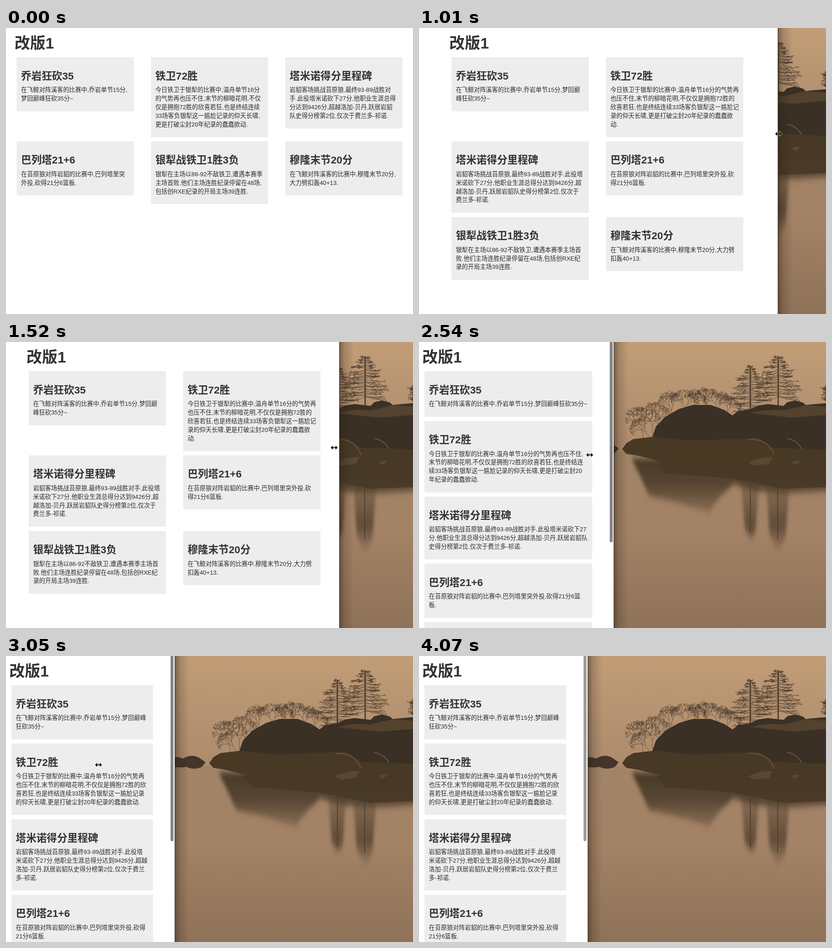
Animation of 893 by 627 pixels, one loop 4.17 s. Source, as an HTML page:

```html
<!DOCTYPE html>
<html lang="zh-CN">
<head>
<meta charset="utf-8">
<title>改版1</title>
<style>
  html, body { margin: 0; width: 100%; height: 100%; overflow: hidden; background: #fff; }
  svg { display: block; width: 893px; height: 627px; }
  text { font-family: "Liberation Sans", "Noto Sans CJK SC", "Noto Sans CJK", sans-serif; fill: #333; }
  .title { font-size: 33.9px; font-weight: 700; }
  .head { font-size: 22.6px; font-weight: 700; }
  .body { font-size: 13.19px; fill: #2b2b2b; }
</style>
</head>
<body>
<svg viewBox="0 0 893 627">
  <defs>
    <linearGradient id="sky" x1="0" y1="0" x2="0" y2="1">
      <stop offset="0" stop-color="#c19d77"/><stop offset=".5" stop-color="#b69371"/><stop offset="1" stop-color="#ac8a6b"/>
    </linearGradient>
    <linearGradient id="water" x1="0" y1="0" x2="0" y2="1">
      <stop offset="0" stop-color="#a38467"/><stop offset=".45" stop-color="#a38265"/><stop offset="1" stop-color="#8f7258"/>
    </linearGradient>
    <linearGradient id="mirror" gradientUnits="userSpaceOnUse" x1="0" y1="250" x2="0" y2="380">
      <stop offset="0" stop-color="#463726"/><stop offset=".5" stop-color="#4b3b29" stop-opacity=".85"/><stop offset="1" stop-color="#5a4733" stop-opacity=".3"/>
    </linearGradient>
    <linearGradient id="streak" gradientUnits="userSpaceOnUse" x1="0" y1="310" x2="0" y2="465">
      <stop offset="0" stop-color="#4b3b29" stop-opacity=".3"/><stop offset=".6" stop-color="#4b3b29" stop-opacity=".75"/><stop offset="1" stop-color="#4b3b29" stop-opacity="0"/>
    </linearGradient>
    <linearGradient id="shade">
      <stop offset="0" stop-color="#2a2016" stop-opacity=".5"/><stop offset=".35" stop-color="#2a2016" stop-opacity=".2"/><stop offset="1" stop-color="#2a2016" stop-opacity="0"/>
    </linearGradient>
    <filter id="soft" x="-30%" y="-20%" width="160%" height="140%"><feGaussianBlur stdDeviation="3 7"/></filter>
  </defs>
  <rect width="893" height="250" fill="url(#sky)"/>
  <rect y="240" width="893" height="387" fill="url(#water)"/>
  <g filter="url(#soft)">
    <path fill="url(#mirror)" d="M466 255H900V326L820 332 740 328 690 312 660 340 636 374 600 362 560 350 505 338 488 300Z"/>
    <path fill="url(#streak)" d="M707 310H746L738 420 728 432 715 410ZM762 310H813L804 430 788 465 769 420Z"/>
  </g>
  <path fill="#463726" opacity=".8" d="M520 262H893V318L800 322 690 300 600 292 540 288Z"/>
  <path stroke="#44362a" stroke-width="2" opacity=".7" d="M727 300V418M787 300V432"/>
  <g id="plants" fill="none" stroke="#43362a"></g>
  <path fill="#43352a" d="M360 226Q376 218 388 225 410 212 428 226L438 233 430 243Q412 251 396 243 380 246 360 242Z"/>
  <path fill="#3a3025" d="M446 235L455 222 470 213 512 208 520 185 540 164 570 147 600 138 640 138 670 149 688 161 700 151 725 148 745 139 765 136 800 140 808 132 825 128 843 133 848 138 893 134V258L560 255 480 249 455 245Z"/>
  <path fill="#5a4932" d="M728 156Q760 146 800 150L850 138 893 142V160L820 166Z" opacity=".75"/>
  <path fill="#483925" d="M446 235L458 221 472 213 520 208 590 216 700 212 745 210 778 232 893 236V270H560L480 249 455 245Z"/>
  <path fill="#584732" d="M722 264Q745 252 776 252L768 267 735 271ZM818 264Q830 256 836 262L826 270Z"/>
  <path fill="none" stroke="#69553c" stroke-width="2" d="M722 214Q765 210 779 247M808 211Q832 217 839 234"/>
  <g id="page"></g>
</svg>
<script>
const LOOP = 4170, U = 0.942;
const cards = [
  ['乔岩狂砍35', '在飞鲸对阵溪客的比赛中,乔岩单节15分,梦回巅峰狂砍35分~'],
  ['铁卫72胜', '今日铁卫于银犁的比赛中,温舟单节16分的气势再也压不住,末节的柳暗花明,不仅仅是拥抱72胜的欣喜若狂,也是终结连续33场客负银犁这一尴尬记录的仰天长啸,更是打破尘封20年纪录的蠢蠢欲动.'],
  ['塔米诺得分里程碑', '岩貂客场挑战苔原狼,最终93-89战胜对手.此役塔米诺砍下27分,他职业生涯总得分达到9426分,超越洛加-贝丹,跃居岩貂队史得分榜第2位,仅次于费兰多-祁诺.'],
  ['巴列塔21+6', '在苔原狼对阵岩貂的比赛中,巴列塔里突外投,砍得21分6篮板.'],
  ['银犁战铁卫1胜3负', '银犁在主场以86-92不敌铁卫,遭遇本赛季主场首败.他们主场连胜纪录停留在48场,包括创RXE纪录的开局主场39连胜.'],
  ['穆隆末节20分', '在飞鲸对阵溪客的比赛中,穆隆末节20分,大力劈扣轰40+13.']
];

// ems: line length of the body text; edge: right side of the window
const narrow = { cols: 1, x: 12, pitch: 0, w: 310.7, ems: 22.05, edge: 370, bar: [361, 406, '#858585'] };
const states = [
  { at: 0, cols: 3, x: 23.5, pitch: 294.6, w: 257, ems: 18.05, edge: 893 },
  { at: 1010, cols: 2, x: 71.3, pitch: 339, w: 301.2, ems: 21.42, edge: 787, cursor: [789, 232] },
  { at: 1520, cols: 2, x: 49.8, pitch: 339, w: 301.2, ems: 21.42, edge: 731, cursor: [720, 231.5] },
  { at: 2030, cols: 1, x: 12, pitch: 0, w: 623, ems: 45.8, edge: 680, bar: [673, 477, '#858585'], cursor: [672.5, 232] },
  { at: 2540, cols: 1, x: 12, pitch: 0, w: 368, ems: 26.42, edge: 427, bar: [418.5, 439, '#858585'], cursor: [374.5, 247.5] },
  { ...narrow, at: 3050, cursor: [203, 238.5] },
  { ...narrow, at: 3560 },
  { ...narrow, at: 4070, bar: [361, 406, '#9c9c9c'] }
];

const glyphWidth = c => c > '\u2e80' ? 1 : /\d/.test(c) ? .556 : /[,.]/.test(c) ? .278 : c === '-' ? .333 : /[+~]/.test(c) ? .584 : .685;
const textWidth = s => [...s].reduce((sum, c) => sum + glyphWidth(c), 0);

function wrap(text, ems) {
  const lines = [''];
  for (const part of text.match(/(?:\d+(?:[-+]\d+)?|[A-Z]+|.)[,.~-]?/g)) {
    const last = lines.length - 1;
    if (textWidth(lines[last] + part) > ems) lines.push(part);
    else lines[last] += part;
  }
  return lines;
}

const rect = (x, y, w, h, fill, rest = '') => `<rect x="${x}" y="${y}" width="${w}" height="${h}" fill="${fill}" ${rest}/>`;
const label = (cls, x, y, s) => `<text class="${cls}" x="${x}" y="${y}">${s}</text>`;

function pageMarkup(s) {
  let out = s.edge < 893 ? rect(s.edge, 0, 32, 627, 'url(#shade)') : '';
  out += rect(0, 0, s.edge, 627, '#fff');
  if (s.edge < 893) out += rect(s.edge, 0, 1, 627, '#4c3d2e');
  out += label('title', s.x - 4.7, 44.5, '改版1');
  let top = 64, tallest = 0;
  cards.forEach(([head, body], i) => {
    const col = i % s.cols;
    if (i && !col) { top += tallest + 10 * U; tallest = 0; }
    const x = s.x + col * s.pitch, lines = wrap(body, s.ems), h = (86 + 20 * lines.length) * U;
    tallest = Math.max(tallest, h);
    out += rect(x, top, s.w, h, '#ededed') + label('head', x + 9.6, top + 48.6, head);
    lines.forEach((line, n) => out += label('body', x + 9.6, top + (81 + 20 * n) * U, line));
  });
  if (s.bar) out += rect(s.bar[0], -8, 6.5, s.bar[1] + 8, s.bar[2], 'rx="3.2"');
  if (s.cursor) out += `<path transform="translate(${s.cursor})" d="M-7.5 0l4.5-4.5v3.5h6v-3.5l4.5 4.5-4.5 4.5v-3.5h-6v3.5z" stroke="#fff" stroke-width="1.2" paint-order="stroke"/>`;
  return out;
}

let seed = 77;
const random = (a, b) => a + (b - a) * ((seed = seed * 16807 % 2147483647) / 2147483647);
const stroke = (d, width, opacity = 1) => `<path d="${d}" stroke-width="${width}" opacity="${opacity}"/>`;

function conifer(x, top, base, spread) {
  let limbs = '', twigs = '';
  for (let i = 0; i < 64; i++) {
    const k = i / 64, y = top + k * (base - top) * .68, side = i % 2 ? 1 : -1;
    const len = spread * (.12 + .88 * Math.sin(k * 2.3)) * random(.5, 1.1), rise = random(-.1, .25) * len;
    limbs += `M${x} ${y}q${side * len / 2} ${rise + 3} ${side * len} ${rise}`;
    for (let j = 0; j < 6; j++) {
      const f = random(.3, 1);
      twigs += `M${x + side * len * f} ${y + rise * f + 1}l${side * random(1, 6)} ${random(-4, 4)}`;
    }
  }
  return stroke(`M${x} ${top}V${base}`, 2.6) + stroke(limbs, .9, .85) + stroke(twigs, 1, .7);
}

function branch(x, y, angle, len, depth) {
  const x2 = x + Math.cos(angle) * len, y2 = y + Math.sin(angle) * len;
  let d = `M${x} ${y}L${x2} ${y2}`;
  if (depth) for (const turn of [-.42, .42]) d += branch(x2, y2, angle + turn + random(-.2, .2), len * random(.68, .86), depth - 1);
  return d;
}
const bush = (x, y, len, lean) => stroke(branch(x, y, -Math.PI / 2 + lean, len, 7), .8, .75);

document.getElementById('plants').innerHTML =
  conifer(727, 52, 197, 43) + conifer(788, 31, 166, 52) + conifer(908, 80, 150, 28) +
  bush(492, 212, 19, -.1) + bush(512, 205, 20, 0) + bush(505, 208, 13, -.6) +
  bush(557, 165, 14, -.2) + bush(582, 158, 13, .1) + bush(605, 150, 12, .1) +
  bush(632, 150, 14, 0) + bush(652, 158, 13, .2) + bush(675, 162, 11, .2);

const page = document.getElementById('page');
const start = performance.now();
let shown;
function draw(now) {
  const t = Math.max(0, now - start) % LOOP;
  const state = states.findLast(s => s.at <= t);
  if (state !== shown) page.innerHTML = pageMarkup(shown = state);
  requestAnimationFrame(draw);
}
draw(start);
</script>
</body>
</html>
```
